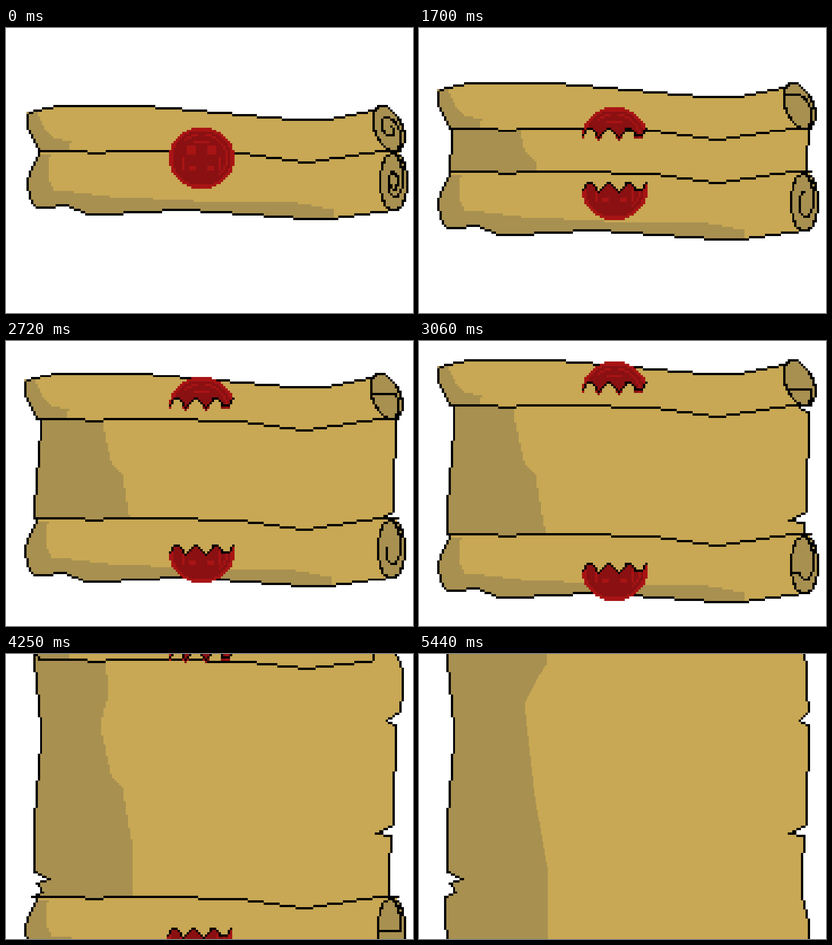
Write an HTML page with a canvas that moves like this. It is 894 px wide and 626 px high and loops after 5610 ms.

```html
<!DOCTYPE html>
<html lang="en">
<head>
<meta charset="utf-8">
<title>Unrolling scroll</title>
<style>
html, body { margin: 0; width: 100%; height: 100%; overflow: hidden; background: #fff; }
canvas { display: block; width: 894px; height: 626px; }
</style>
</head>
<body>
<canvas id="stage" width="894" height="626"></canvas>
<script>
const ctx = document.getElementById('stage').getContext('2d');
const U = 894 / 180, STEP = 170, STEPS = 33;
const TAN = '#c8a854', DARK = '#a89050', RED = '#a81414', DEEP = '#8a1012', INK = '#000';
const SEAM = 54, SEAL = 44, OPENS = 6, FLAT = 23;
let ox = 0, oy = 0;

// Everything is drawn in coarse cells, moved by (ox, oy).
function rect(x, y, w, h, color) {
  const l = Math.round((x + ox) * U), t = Math.round((y + oy) * U);
  ctx.fillStyle = color;
  ctx.fillRect(l, t, Math.round((x + ox + w) * U) - l, Math.round((y + oy + h) * U) - t);
}

function line(pts) {
  for (let i = 1; i < pts.length; i++) {
    const [x0, y0] = pts[i - 1], [x1, y1] = pts[i];
    const n = Math.ceil(Math.max(Math.abs(x1 - x0), Math.abs(y1 - y0), 1));
    for (let k = 0; k <= n; k++) {
      rect(Math.round(x0 + (x1 - x0) * k / n), Math.round(y0 + (y1 - y0) * k / n), 1, 1, INK);
    }
  }
}

function fill(pts, color, snap = 1) {
  const ys = pts.map(p => p[1]);
  for (let y = Math.floor(Math.min(...ys)); y <= Math.max(...ys); y++) {
    const hits = [];
    pts.forEach(([x0, y0], i) => {
      const [x1, y1] = pts[(i + 1) % pts.length];
      if ((y0 <= y) !== (y1 <= y)) hits.push(x0 + (x1 - x0) * (y - y0) / (y1 - y0));
    });
    hits.sort((a, b) => a - b);
    for (let i = 0; i + 1 < hits.length; i += 2) {
      const l = Math.ceil(hits[i]), r = Math.floor(hits[i + 1] / snap) * snap;
      if (r >= l) rect(l, y, r - l + 1, 1, color);
    }
  }
}

function lerp(keys, v) {
  const i = keys.findIndex(k => v <= k[0]);
  if (i === 0) return keys[0][1];
  if (i < 0) return keys[keys.length - 1][1];
  const [a, p] = keys[i - 1], [b, q] = keys[i];
  return p + (q - p) * (v - a) / (b - a);
}
const at = (keys, n) => Math.round(lerp(keys, n));
const back = pts => pts.slice().reverse();

// A height curve through a few points, stepped per column
function curve(keys, from, to) {
  const pts = [];
  for (let x = from; x <= to; x++) pts.push([x, at(keys, x)]);
  return pts;
}

// Offsets in cells and coil turns, by step
const topMove = [[5, 0], [14, -18], [16, -20], [21, -34], [25, -52], [32, -84]];
const botMove = [[5.5, 0], [10, 9], [16, 24], [21, 41], [32, 74]];
const sealUp = [[6, 0], [10, -9], [16, -28], [21, -45], [32, -73]];
const sealDown = [[5.3, 0], [10, 14], [16, 36], [21, 57], [25, 67], [32, 88]];
const topTurns = [[6, 1.3], [10, 0.5], [16, 0.3], [21, 0]];
const botTurns = [[6, 1.7], [10, 1], [16, 0.8], [21, 0.45], [25, 0.28]];

const topLeft = [[14, 53], [9, 44], [9, 38], [12, 36]];
const topEdge = curve([[13, 36], [23, 34], [60, 34], [66, 34.5], [122, 39.5], [128, 40], [141, 40],
  [144, 39.5], [162, 36]], 13, 162);
const topShade = [[9, 37], [13, 37], [16, 43], [20, 48], [28, 50], [27, 54], [14, 53], [9, 44]];
const botLeft = [[14, 55], [10, 63], [9, 68], [10, 75], [12, 78]];
const botEdge = curve([[13, 79], [20, 78.6], [26, 78], [35, 81.5], [43, 82], [68, 80.5], [77, 80],
  [86, 80.5], [127, 83.5], [136, 84], [146, 83.5], [168, 80.5], [173, 80]], 13, 173);
const botShade = [...botLeft, ...botEdge.filter(p => p[0] < 145),
  ...back(curve([[21, 71.5], [46, 74.5], [83, 76.5], [129, 77.5], [145, 80.5]], 21, 144)),
  [18, 65], [19, 56]];

function seam(sag) {
  const keys = [[35, 0], [36, 0.2], [43, 0.2], [44, 0], [80, 0], [86, 0.1], [108, 0.3], [129, 0.9],
    [132, 1], [136, 0.9], [162, 0.1], [166, 0]];
  return curve(keys.map(([x, d]) => [x, SEAM + d * sag]), 14, 174);
}

// Roll ends: a leaning ellipse with a coil that winds inward from its rim
const topCap = { x: 168.7, y: 44, w: 6.6, h: 10, lean: 0.28, dir: -1 };
const botCap = { x: 171, y: 67.5, w: 6, h: 12.7, lean: 0, dir: 1 };

function coil(cap, turns, size) {
  const pts = [];
  for (let t = 0; t <= turns; t += 0.02) {
    const a = t * 2 * Math.PI, s = size(t);
    const dy = -cap.dir * cap.h * s * Math.cos(a);
    pts.push([cap.x + cap.w * s * Math.sin(a) + cap.lean * dy, cap.y + dy]);
  }
  return pts;
}

function drawCap(cap, turns) {
  const rim = coil(cap, 1, () => 1);
  fill(rim, DARK);
  line([...rim, rim[0]]);
  if (turns < 0.05) return;
  const inner = coil(cap, turns, t => 1 / (1 + 2 * t));
  if (turns < 0.75) {
    const y = inner[inner.length - 1][1], dy = y - cap.y;
    inner.push([cap.x + cap.lean * dy - cap.w * Math.sqrt(1 - (dy / cap.h) ** 2), y]);
  }
  line(inner);
}

function drawTop(n, move) {
  const flat = n >= FLAT;
  ox = n >= OPENS && !flat ? -1 : 0;
  oy = move;
  const fold = seam(flat ? 4 : 5).filter(p => !flat || p[0] < 163);
  const side = flat ? [[163, 36], [162, 53]] : [[163, 36], [topCap.x, topCap.y], [171, SEAM]];
  fill([...topLeft, ...topEdge, ...side, ...back(fold)], TAN);
  fill(topShade, DARK);
  line([...topLeft, ...topEdge]);
  line(fold);
  if (flat) line(side);
  else drawCap(topCap, lerp(topTurns, n));
}

function drawBottom(n, move) {
  ox = n >= OPENS ? -1 : 0;
  oy = move;
  const fold = seam(5);
  fill([...botLeft, ...botEdge, [botCap.x, botCap.y], ...back(fold)], TAN);
  fill(botShade, DARK);
  line([...botLeft, ...botEdge]);
  drawCap(botCap, lerp(botTurns, n));
  line(fold);
}

// Sheet with torn edges
const sheetLeft = [[12, -1], [12, 2], [15, 33], [15, 37], [12, 73], [12, 96], [19, 99], [13, 101],
  [16, 105], [11, 107], [11, 121], [12, 122], [12, 127]];
const sheetRight = [[168, 29], [172, 31], [172, 51], [171, 52], [171, 75], [163, 79], [170, 80], [170, 87],
  [169, 88], [169, 106], [172, 119], [172, 127]];
const shadowRolled = [[0, 43], [12, 44.4], [20, 44], [31, 41], [53, 46], [59, 51], [82, 55]];
const shadowFlat = [[4, 55.6], [10, 51.7], [22, 46], [62, 50.4], [95, 56.2]];

function drawSheet(n, top, bot) {
  const y0 = n >= FLAT ? 0 : SEAM + top, y1 = SEAM + bot;
  const bulge = lerp([[25, 1], [28, 0]], n), mix = lerp([[25, 0], [32, 1]], n);
  const right = [[170 + 2 * bulge, -1], [171 + 4 * bulge, 7], [171 + 4 * bulge, 16],
    [172 + 2 * bulge, 25], ...sheetRight];
  const shadow = [];
  for (let y = 127; y >= -1; y--) {
    const a = lerp(shadowRolled, y), b = lerp(shadowFlat, y);
    shadow.push([a + (b - a) * mix, y]);
  }
  ox = oy = 0;
  ctx.save();
  ctx.beginPath();
  ctx.rect(0, Math.round(y0 * U), 894, Math.round((y1 + 1) * U) - Math.round(y0 * U));
  ctx.clip();
  fill([...sheetLeft, ...back(right)], TAN);
  fill([...sheetLeft, ...shadow], DARK, mix ? 0.5 : 1);
  line(sheetLeft);
  line(right);
  ctx.restore();
  rect(86, y1, 76, 6, TAN);
}

// Wax seal, broken along a wave
const crack = x => Math.round(10.7 - 1.9 * Math.cos((x - 75) * 2 * Math.PI / 8.6));
const crackLine = (to, dy = 0) => {
  const pts = [];
  for (let x = 72; x <= to; x++) pts.push([x, crack(x) + dy]);
  return pts;
};

function relief(mx, y, whole) {
  const eyes = whole && mx > 2 && mx < 7 && y > 7 && y < 12;
  const cheeks = mx === 8 && y > 12 && y < 19;
  const brow = mx < 4 && y === 6;
  const chin = mx > 2 && mx < 6 && y > 16 && y < 19;
  return eyes || cheeks || brow || chin;
}

function wax(whole, keep) {
  for (let y = 0; y < 27; y++) {
    for (let x = 72; x <= 100; x++) {
      const d = Math.hypot((x - 86) / 14.6, (y - 13) / 13.6);
      if (d > 1 || !keep(x, y)) continue;
      const ring = d > 0.88 || (d > 0.74 && d < 0.8 && (x > 93 || y < 6));
      rect(x, y, 1, 1, ring || relief(Math.abs(x - 86), y, whole) ? RED : DEEP);
    }
  }
}

function drawSeal(n) {
  const up = SEAL + at(sealUp, n), down = SEAL + at(sealDown, n);
  ox = 0;
  oy = up;
  if (n < OPENS) {
    wax(true, () => true);
    line(crackLine(72 + 28 * n / 5 - (n ? 0 : 1)));
    return;
  }
  if (n === OPENS) {
    for (let x = 72; x <= 100; x++) rect(x, crack(x), 1, down - up + 1, TAN);
  }
  wax(false, (x, y) => y <= crack(x) + (crack(x) > 11 ? 1 : 0));
  line(crackLine(100));
  ox = n >= FLAT ? -1 : 0;
  oy = down;
  wax(false, (x, y) => y > crack(x));
  line(crackLine(100, 1));
}

function draw(n) {
  ctx.fillStyle = '#fff';
  ctx.fillRect(0, 0, 894, 626);
  const top = at(topMove, n), bot = at(botMove, n);
  if (n >= OPENS) drawSheet(n, top, bot);
  drawTop(n, top);
  drawBottom(n, bot);
  drawSeal(n);
}

let shown = -1;
function tick() {
  const n = Math.floor(performance.now() / STEP) % STEPS;
  if (n !== shown) draw(shown = n);
  requestAnimationFrame(tick);
}
tick();
</script>
</body>
</html>
```
